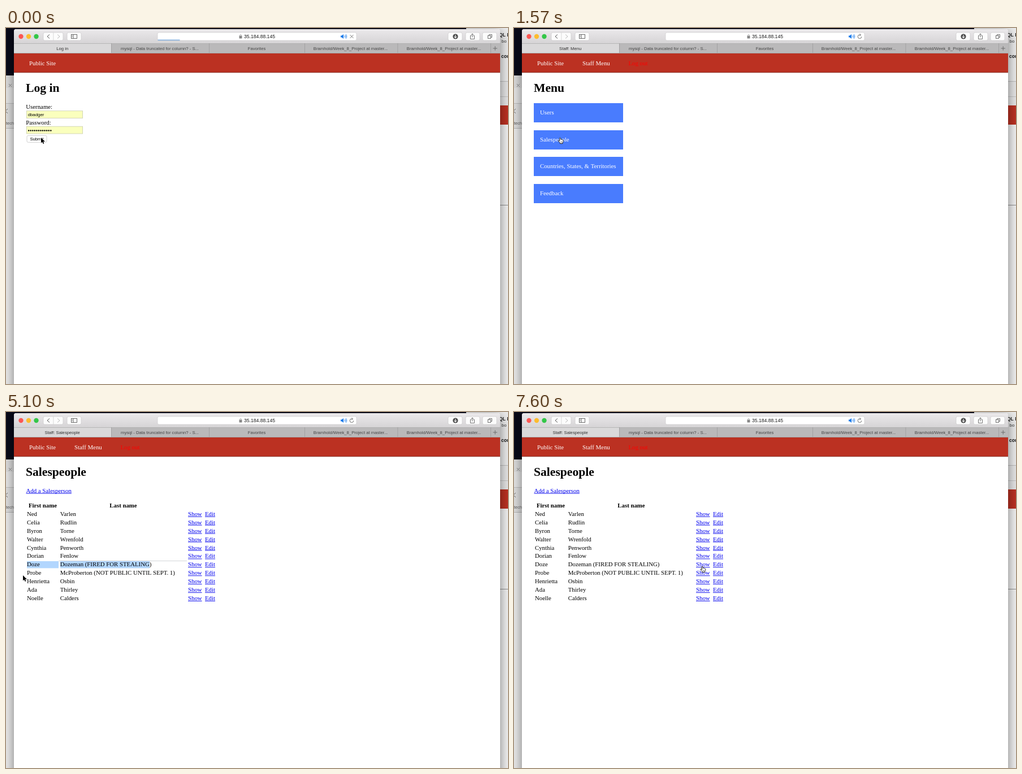
Recreate the animation shown at these times as an HTML page with a canvas. Size 888 by 630 pixels, loop 8000 ms.

```html
<!DOCTYPE html>
<html lang="en">
<head>
<meta charset="utf-8">
<title>Staff site</title>
<style>
  html, body { margin: 0; width: 100%; height: 100%; overflow: hidden; background: #fff; }
  canvas { display: block; }
</style>
</head>
<body>
<canvas id="stage" width="888" height="630"></canvas>
<script>
const ctx = document.getElementById('stage').getContext('2d');
const LOOP = 8000;
const SERIF = '"Liberation Serif", serif';
const SANS = '"Liberation Sans", sans-serif';
const RED = '#bb3122', LINK = '#0000ee', PICK = '#b2d6fe';

// Spans of screen updates: [first, last, count]
const BURSTS = [[140, 680, 4], [830, 1120, 3], [1270, 2310, 8], [2460, 3190, 6],
  [3490, 4360, 7], [4660, 5690, 8], [5840, 6580, 6], [6870, 7600, 6]];

// Pointer path: [time, x, y, shape]
const PATH = [
  [0, 62, 194, 'arrow'], [140, 61, 194, 'arrow'], [500, 25, 180, 'arrow'], [830, 41, 171, 'arrow'],
  [1120, 62, 190, 'hand'], [1500, 82, 199, 'hand'], [1850, 84, 199, 'hand'],
  [2160, 108, 206, 'beam'], [2310, 120, 213, 'beam'], [2750, 60, 272, 'beam'], [2950, 38, 284, 'beam'],
  [3190, 38, 270, 'beam'], [3490, 46, 270, 'beam'], [3780, 137, 270, 'beam'],
  [4360, 254, 270, 'beam'], [4660, 238, 274, 'beam'], [4950, 50, 290, 'arrow'],
  [5100, 30, 289, 'arrow'], [5400, 34, 286, 'beam'], [5690, 38, 285, 'beam'],
  [5840, 52, 285, 'beam'], [6580, 281, 284, 'beam'], [6870, 289, 294, 'beam'],
  [7160, 314, 310, 'arrow'], [7400, 328, 296, 'hand'], [7600, 334, 278, 'hand']];

const PEOPLE = [['Ned', 'Varlen'], ['Celia', 'Rudlin'], ['Byron', 'Torne'], ['Walter', 'Wrenfold'],
  ['Cynthia', 'Penworth'], ['Dorian', 'Fenlow'], ['Doze', 'Dozeman (FIRED FOR STEALING)'],
  ['Probe', 'McProberton (NOT PUBLIC UNTIL SEPT. 1)'], ['Henrietta', 'Osbin'],
  ['Ada', 'Thirley'], ['Noelle', 'Calders']];

function rect(x, y, w, h, fill) {
  ctx.fillStyle = fill;
  ctx.fillRect(x, y, w, h);
}

function round(x, y, w, h, r, fill, stroke) {
  ctx.beginPath();
  ctx.roundRect(x, y, w, h, r);
  ctx.fillStyle = fill;
  ctx.fill();
  if (stroke) { ctx.strokeStyle = stroke; ctx.lineWidth = 0.7; ctx.stroke(); }
}

function dot(x, y, r, fill) {
  ctx.beginPath();
  ctx.arc(x, y, r, 0, 7);
  ctx.fillStyle = fill;
  ctx.fill();
}

function line(points, color, width = 1) {
  ctx.beginPath();
  points.forEach(([x, y]) => ctx.lineTo(x, y));
  ctx.strokeStyle = color;
  ctx.lineWidth = width;
  ctx.stroke();
}

function vGrad(y0, y1, a, b) {
  const g = ctx.createLinearGradient(0, y0, 0, y1);
  g.addColorStop(0, a);
  g.addColorStop(1, b);
  return g;
}

function text(s, x, y, font, color = '#000', align = 'left') {
  ctx.font = font;
  ctx.fillStyle = color;
  ctx.textAlign = align;
  ctx.fillText(s, x, y);
}

const serif = (s, x, y, color, align) => text(s, x, y, '10.8px ' + SERIF, color, align);
const bold = (s, x, y, size = 10.8, align) => text(s, x, y, `bold ${size}px ${SERIF}`, '#000', align);
const sans = (s, x, y, size, color, align) => text(s, x, y, `${size}px ${SANS}`, color, align);

function link(s, x, y) {
  serif(s, x, y, LINK);
  rect(x, y + 1, ctx.measureText(s).width, 0.9, LINK);
}

function drawDesktop() {
  rect(0, 0, 888, 630, '#f1f1f1');
  rect(0, 0, 814, 84, '#090a18');
  rect(814, 0, 74, 94, '#ececec');
  // window behind, left side
  rect(0, 84, 14, 50, '#dcdcdc');
  rect(0, 106, 14, 28, '#e6e6e6');
  rect(0, 133, 14, 1, '#bdbdbd');
  rect(0, 134, 14, 43, '#dedede');
  rect(0, 177, 14, 1, '#b5b5b5');
  rect(0, 178, 14, 452, '#ebebeb');
  // window behind, right side
  rect(874, 94, 14, 43, '#e6e6e6');
  rect(874, 94, 14, 1, '#bcbcbc');
  rect(874, 121, 14, 1, '#c6c6c6');
  rect(874, 137, 14, 34, RED);
  rect(874, 313, 14, 1, '#8e8e8e');

  ctx.save();
  ctx.shadowColor = 'rgba(0,0,0,0.5)';
  ctx.shadowBlur = 20;
  ctx.shadowOffsetY = 4;
  round(14, 2, 860, 660, 4, '#fff');
  ctx.restore();

  line([[5, 99], [10, 104]], '#777');
  line([[10, 99], [5, 104]], '#777');
  line([[3, 143], [-1, 147], [3, 151]], '#666');
  sans('tech', 0, 171, 7.5, '#555');
  text('QL I', 872, 15, 'bold 8.5px ' + SANS, '#222');
  sans('. bo', 872, 25.5, 8, '#333');
  text('cou', 876, 53, 'bold 8.5px ' + SANS, '#111');
}

function drawToolbar() {
  round(14, 2, 860, 26, [4, 4, 0, 0], vGrad(2, 27, '#ebe9eb', '#d6d4d6'));
  [[26.5, '#fc5753'], [40, '#fdbc2e'], [53.5, '#33c748']].forEach(([x, c]) => dot(x, 15, 4.2, c));

  [[66, 35], [108, 25], [782, 25], [813, 25], [843, 25]].forEach(([x, w]) =>
    round(x, 8, w, 14, 2.5, '#fcfcfc', '#cbc9cb'));
  rect(83.5, 8, 0.8, 14, '#d2d2d2');
  line([[77, 11.5], [73, 15], [77, 18.5]], '#555');
  line([[91, 11.5], [95, 15], [91, 18.5]], '#b9b9b9');

  ctx.strokeStyle = '#5c5c5c';
  ctx.lineWidth = 0.9;
  ctx.strokeRect(115.5, 11.5, 10, 7);
  line([[119, 11.5], [119, 18.5]], '#5c5c5c', 0.9);
  line([[116.5, 13.5], [118, 13.5]], '#5c5c5c', 0.6);
  line([[116.5, 15.5], [118, 15.5]], '#5c5c5c', 0.6);

  dot(795, 15, 4.6, '#4d4d4d');
  line([[795, 12.2], [795, 17.2]], '#fff', 1.2);
  line([[792.9, 15.3], [795, 17.5], [797.1, 15.3]], '#fff', 1.1);

  line([[823.5, 13.5], [821.5, 13.5], [821.5, 19.5], [828.5, 19.5], [828.5, 13.5], [826.5, 13.5]], '#666', 0.9);
  line([[825, 16.5], [825, 10]], '#666', 0.9);
  line([[823, 12], [825, 10], [827, 12]], '#666', 0.9);

  ctx.strokeStyle = '#666';
  ctx.strokeRect(852.5, 13.5, 5, 5);
  line([[854.5, 13.5], [854.5, 11.5], [859.5, 11.5], [859.5, 16.5], [857.5, 16.5]], '#666', 0.9);
}

function drawAddress(progress, faint) {
  round(268, 8, 352, 14, 2.5, '#fff', '#cfcdcf');
  round(412.5, 14, 5, 4.5, 0.6, '#858585');
  ctx.beginPath();
  ctx.arc(415, 13.8, 1.7, Math.PI, 0);
  ctx.strokeStyle = '#858585';
  ctx.lineWidth = 0.9;
  ctx.stroke();
  sans('35.184.88.145', 421, 18.2, 8.6, '#1c1c1c');

  ctx.beginPath();
  [[592, 13.5], [594, 13.5], [597, 11], [597, 19], [594, 16.5], [592, 16.5]].forEach(p => ctx.lineTo(...p));
  ctx.fillStyle = '#1779ea';
  ctx.fill();
  [2.2, 4, 5.8].forEach(r => {
    ctx.beginPath();
    ctx.arc(597, 15, r, -0.75, 0.75);
    ctx.strokeStyle = '#1779ea';
    ctx.lineWidth = 0.8;
    ctx.stroke();
  });

  if (progress) {
    rect(268.5, 20.6, Math.min(progress, 351), 1.5, faint ? '#7eabdc' : '#2671ce');
    line([[608.5, 12], [614.5, 18]], '#6b6b6b', 0.9);
    line([[614.5, 12], [608.5, 18]], '#6b6b6b', 0.9);
  } else {
    ctx.beginPath();
    ctx.arc(611.5, 15.3, 3.3, 0, 5.2);
    ctx.strokeStyle = '#606060';
    ctx.lineWidth = 0.9;
    ctx.stroke();
    line([[611.6, 10.2], [613.6, 12.3], [611.2, 14]], '#606060', 0.9);
  }
}

function drawTabs(title) {
  rect(14, 27, 860, 18, '#bab9ba');
  rect(14, 27, 172, 18, '#dad9da');
  rect(14, 27, 860, 0.8, '#b0afb0');
  rect(14, 44, 860, 0.8, '#a3a2a3');
  [186, 359, 528, 692.5, 857].forEach(x => rect(x, 27, 0.8, 17, '#9d9c9d'));
  sans(title, 99.7, 38.6, 7.7, '#303030', 'center');
  const repo = 'Bramhold/Week_8_Project at master...';
  [['mysql - Data truncated for column? - S...', 272], ['Favorites', 443.5], [repo, 609.5], [repo, 774.5]]
    .forEach(([s, x]) => sans(s, x, 38.6, 7.7, '#474747', 'center'));
  line([[861.5, 36], [869, 36]], '#666', 0.9);
  line([[865.2, 32.3], [865.2, 39.7]], '#666', 0.9);
}

function drawHeader(staff) {
  rect(14, 45, 860, 34, RED);
  rect(14, 78.4, 860, 0.8, '#7d3a33');
  serif('Public Site', 41, 66, '#fff');
  if (staff) {
    serif('Staff Menu', 121, 66, '#fff');
    serif('Log out', 202.5, 66, '#ff0000');
  }
}

function drawLogin() {
  bold('Log in', 35, 112.5, 21.6);
  [['Username:', 143], ['Password:', 170.5]].forEach(([label, y]) => {
    serif(label, 35.3, y);
    rect(36, y + 3.3, 100, 13.6, '#cbcdb0');
    rect(36.8, y + 4.1, 98.4, 12, '#faffbd');
  });
  sans('dbadger', 38.7, 156, 7.8);
  for (let i = 0; i < 12; i++) dot(40.2 + i * 3.55, 181.6, 1.25, '#000');
  round(37, 190.3, 35, 12, 2.2, '#fff', '#bdbdbd');
  sans('Submit', 54.4, 199.1, 7.7, '#000', 'center');
}

function drawMenu() {
  bold('Menu', 35, 112.5, 21.6);
  ['Users', 'Salespeople', 'Countries, States, & Territories', 'Feedback'].forEach((s, i) => {
    const y = 133 + i * 47.5;
    rect(35, Math.round(y), 158, 34, '#497cfe');
    serif(s, 46, y + 20.3, '#fff');
  });
}

function drawPick(row, end) {
  const y = 174.4 + row * 14.93;
  rect(37, y, Math.min(end, 93) - 37, 12.4, PICK);
  if (end > 96) {
    rect(96, y, end - 96, 12.4, PICK);
    rect(93, y - 0.9, 227, 0.9, row === 6 ? '#cfd2d5' : '#c3dcf5');
  }
}

function drawTable(pick) {
  bold('Salespeople', 35, 112.5, 21.6);
  link('Add a Salesperson', 35.5, 142.6);
  bold('First name', 65, 169, 10.8, 'center');
  bold('Last name', 207.5, 169, 10.8, 'center');
  if (pick) drawPick(...pick);
  PEOPLE.forEach(([first, last], i) => {
    const y = 183.8 + i * 14.93;
    serif(first, 37, y);
    serif(last, 95.7, y);
    link('Show', 322, y);
    link('Edit', 352, y);
  });
}

const shapes = {
  arrow() {
    const p = new Path2D('M0 0V9.6L2.2 7.6L3.7 11L5.3 10.3L3.9 7H6.9Z');
    ctx.lineWidth = 1.2;
    ctx.strokeStyle = '#fff';
    ctx.stroke(p);
    ctx.fillStyle = '#000';
    ctx.fill(p);
  },
  beam() {
    const p = new Path2D('M-2.2 -5Q0 -5 0 -3.6Q0 -5 2.2 -5M0 -3.6V3.6M-2.2 5Q0 5 0 3.6Q0 5 2.2 5M-1.2 1.6H1.2');
    ctx.lineWidth = 1;
    ctx.strokeStyle = '#111';
    ctx.stroke(p);
  },
  hand() {
    const p = new Path2D('M-1.8 -4.2Q-0.9 -5.6 0 -4.2L0.5 -1.6Q1.5 -2.6 2.2 -1.4Q3.2 -2 3.7 -0.9Q4.8 -1 4.8 .6' +
      'Q4.8 2.8 3.6 4V5.5H-1V4.3L-4 .8Q-4.2 -.6 -2.8 -.1L-1.5 1Z');
    ctx.fillStyle = '#fff';
    ctx.fill(p);
    ctx.lineWidth = 0.9;
    ctx.strokeStyle = '#111';
    ctx.stroke(p);
    line([[0.6, 1.6], [0.6, 3.8]], '#111', 0.6);
    line([[2.3, 1.6], [2.3, 3.8]], '#111', 0.6);
  }
};

function pointerAt(t) {
  let i = PATH.length - 1;
  while (i && PATH[i][0] > t + 2) i--;
  const a = PATH[i], b = PATH[i + 1] || a;
  const k = b === a ? 0 : Math.max(0, (t - a[0]) / (b[0] - a[0]));
  return { x: a[1] + (b[1] - a[1]) * k, y: a[2] + (b[2] - a[2]) * k, shape: a[3] };
}

// Hold the picture between screen updates
function snap(t) {
  let held = 0;
  for (const [a, b, n] of BURSTS) {
    if (t < a) break;
    const gap = (b - a) / (n - 1);
    held = a + gap * Math.floor((Math.min(t, b) - a) / gap + 0.05);
  }
  return held;
}

function progressAt(t) {
  if (t < 500) return 39 + t * 0.04;
  if (t < 830) return 60 + (t - 500) * 0.3;
  if (t < 960) return 351;
  if (t >= 1850 && t < 2450) return 30 + (t - 1850) * 16 / 460;
  if (t >= 2450 && t < 2600) return 351;
  return 0;
}

function pickAt(t, x) {
  if (t >= 3480 && t < 5835) return [6, t < 4355 ? Math.min(x - 3, 254) : 254];
  if (t >= 5835 && t < 7150) return [7, t < 6570 ? x + 2 : 283];
  return null;
}

function draw(time) {
  const t = snap(time);
  const page = t < 490 ? 'login' : t < 2150 ? 'menu' : 'table';
  const pointer = pointerAt(t);
  const titles = { login: 'Log in', menu: 'Staff: Menu', table: 'Staff: Salespeople' };

  drawDesktop();
  drawToolbar();
  drawAddress(progressAt(t), t < 140);
  drawTabs(titles[page]);
  drawHeader(page !== 'login');
  if (page === 'login') drawLogin();
  else if (page === 'menu') drawMenu();
  else drawTable(pickAt(t, pointer.x));

  ctx.save();
  ctx.translate(pointer.x, pointer.y);
  shapes[pointer.shape]();
  ctx.restore();
}

const start = performance.now();
function tick() {
  draw((performance.now() - start) % LOOP);
  requestAnimationFrame(tick);
}
tick();
</script>
</body>
</html>
```
